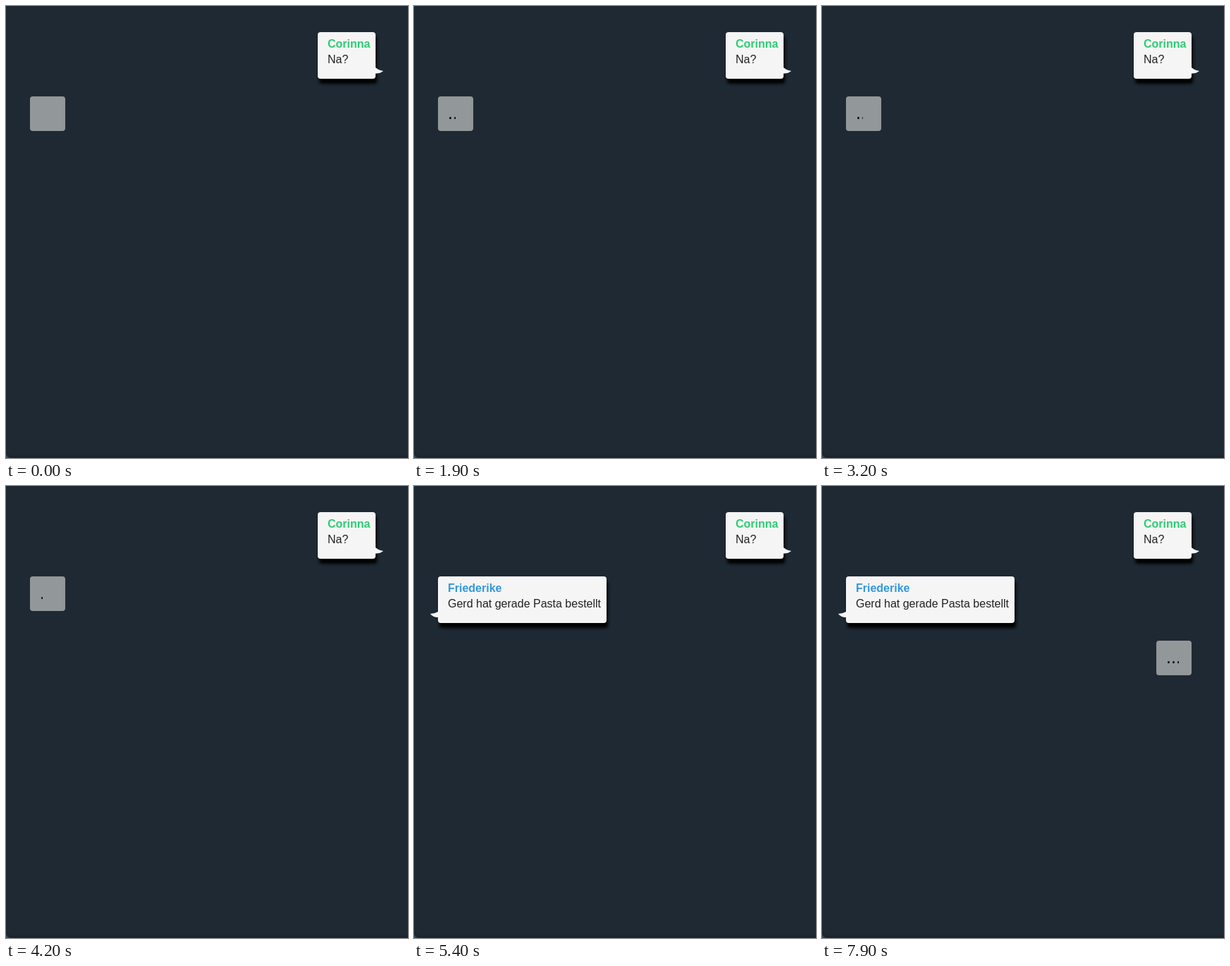
Animation of 570x640 px, one loop 8 s. Source, as an HTML page:

```html
<!DOCTYPE html>
<html lang="de">
<head>
<meta charset="utf-8">
<title>Chat</title>
<style>
  html, body { margin: 0; width: 100%; height: 100%; overflow: hidden; background: #3d474f; }
  #chat {
    position: absolute; inset: 0; overflow: hidden;
    background: #1e2933; border-bottom-left-radius: 8px;
    box-shadow: inset 0 -4px 2px -1px #1b252f;
    font: 16px/22px "Liberation Sans", Arial, sans-serif; color: #222;
  }
  .bubble, .typing { position: absolute; box-sizing: border-box; border-radius: 4px; }
  .bubble {
    height: 66px; padding: 6px 0 0 14px; white-space: nowrap;
    background: #f5f5f5; box-shadow: 2px 7px 4px #000;
  }
  .bubble b { display: block; }
  .bubble svg { position: absolute; left: 0; top: 0; width: 1px; height: 1px; overflow: visible; fill: #f5f5f5; }
  .typing { width: 50px; height: 49px; background: #92979a; }
  .typing span {
    position: absolute; left: 14px; top: 3px; height: 40px; overflow: hidden;
    font-size: 25px; line-height: 40px; color: #000;
  }
  .right { left: 442px; top: 37px; width: 82px; }
  .left { left: 34px; top: 128px; width: 239px; }
  .right b { color: #2ecc71; }
  .left b { color: #3498db; }
</style>
</head>
<body>
<div id="chat">
  <div class="bubble right">
    <svg><path d="M82 50Q86 54 93 55Q88 59 82 58.5Z"/></svg>
    <b>Corinna</b>Na?
  </div>
  <div class="bubble left" id="reply">
    <svg><path d="M0 50Q-5 53 -11 53Q-7 58 0 58Z"/></svg>
    <b>Friederike</b>Gerd hat gerade Pasta bestellt
  </div>
  <div class="typing" id="typing"><span id="dots">...</span></div>
</div>
<script>
  const LOOP = 8000, REPLY = 5400, NEXT = 7000;
  const CYCLE = 1365, LEAD = 205;       // dot cycle length and its phase at time 0
  const FIRST = 208, GAP = 455, STEP = 7; // first dot, delay and distance between dots
  const { reply, typing, dots } = Object.fromEntries(
    ["reply", "typing", "dots"].map(id => [id, document.getElementById(id)]));

  // Width of the dots uncovered so far, in whole pixels
  function dotWidth(t) {
    const since = (t + LEAD) % CYCLE - FIRST;
    if (since < 0) return 0;
    const dot = Math.min(2, Math.floor(since / GAP));
    const age = since - dot * GAP;
    return 2 + dot * STEP + 1 + (age >= 70) + (age >= 176);
  }

  function draw(t) {
    const second = t >= NEXT;
    reply.style.display = t >= REPLY ? "block" : "none";
    typing.style.display = t < REPLY || second ? "block" : "none";
    typing.style.left = (second ? 474 : 34) + "px";
    typing.style.top = (second ? 219 : 128) + "px";
    dots.style.width = dotWidth(t) + "px";
  }

  const start = performance.now();
  function tick() {
    draw((performance.now() - start) % LOOP);
    requestAnimationFrame(tick);
  }
  tick();
</script>
</body>
</html>
```
